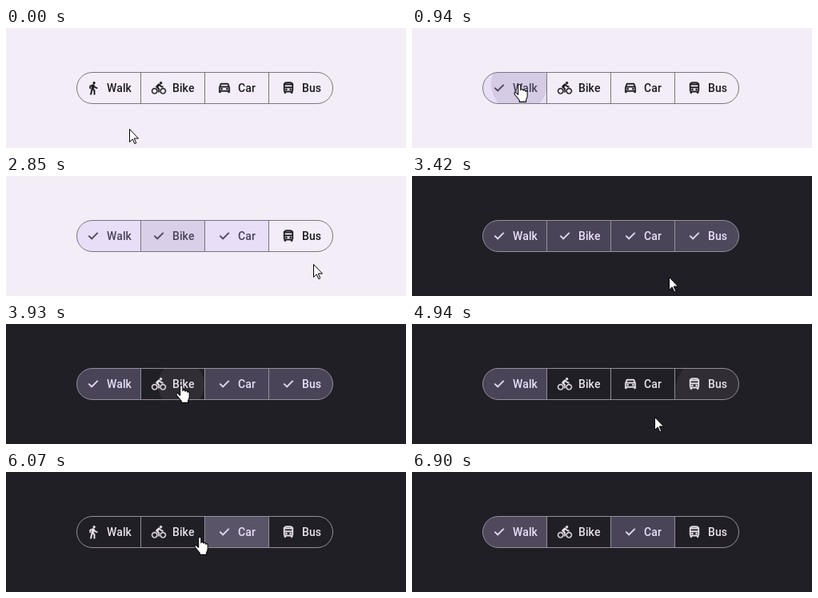
These frames come from a looping animation (500x150 px, 7230 ms). An HTML page:

```html
<!DOCTYPE html>
<html lang="en">
<head>
<meta charset="utf-8">
<title>Segmented buttons</title>
<style>
  html, body { margin: 0; width: 100%; height: 100%; overflow: hidden; }
  svg { display: block; width: 500px; height: 150px; }
  svg { --bg: #f3edf7; --ink: #1d1b20; --line: #79747e; --fill: #e8def8; --on: #4a4458; }
  svg.dark { --bg: #211f26; --ink: #e6e0e9; --line: #938f99; --fill: #4a4458; --on: #e8def8; }
  .bg { fill: var(--bg); }
  .outline { fill: none; stroke: var(--line); }
  .seg { color: var(--ink); fill: currentColor; }
  .seg.on { color: var(--on); }
  .box { fill: none; }
  .on .box { fill: var(--fill); }
  .ripple { fill: var(--on); fill-opacity: .07; }
  .on .ripple { fill-opacity: .12; }
  .icon, .check { stroke: currentColor; stroke-width: .5; }
  .check, .on .icon { visibility: hidden; }
  .on .check { visibility: visible; }
  text { font: 500 14px Roboto, sans-serif; letter-spacing: .1px; }
  .cursor { fill: #fff; stroke: #000; stroke-linejoin: round; }
</style>
</head>
<body>
<svg viewBox="0 0 500 150">
  <clipPath id="pill"><rect x="88.5" y="55.5" width="320" height="39" rx="19.5"/></clipPath>
  <rect class="bg" width="500" height="150"/>
  <g id="segs" clip-path="url(#pill)"></g>
  <rect class="outline" x="88.5" y="55.5" width="320" height="39" rx="19.5"/>
  <path class="outline" d="M168.5 56v38M248.5 56v38M328.5 56v38"/>
  <path id="arrow" class="cursor" d="M.5.5v16l3.7-3.6 2.6 5.8 2-.9-2.6-5.8h5.3z"/>
  <path id="hand" class="cursor" d="M5.5 12.5V2Q5.5.5 7 .5T8.5 2V7.5Q8.5 6 10 6.2T11.5 8Q11.7 6.7 13 7T14.3 9Q14.5 8 15.6 8.4T16.5 10V14.5Q16.5 16.5 15 19V21.5H7V19.5L2 13.5Q.2 11 1.2 10.3T3.5 11L5.5 13"/>
</svg>
<script>
const LOOP = 7230, DARK_AT = 3250;
const LEFT = 88.5, WIDTH = 80, TOP = 55, HEIGHT = 40;

const disc = (x, y) => `M${x - 1.5} ${y}a1.5 1.5 0 1 0 3 0 1.5 1.5 0 1 0-3 0z`;
const wheel = x => `M${x} 12c-2.8 0-5 2.2-5 5s2.2 5 5 5 5-2.2 5-5-2.2-5-5-5zm0 8.5c-1.9 0-3.5-1.6-3.5-3.5s1.6-3.5 3.5-3.5 3.5 1.6 3.5 3.5-1.6 3.5-3.5 3.5z`;
const CHECK = 'M9.55 18l-5.7-5.7 1.425-1.425L9.55 15.15l9.175-9.175L20.15 7.4z';

// label, label x, icon path
const items = [
  ['Walk', 126, 'M13.5 5.5c1.1 0 2-.9 2-2s-.9-2-2-2-2 .9-2 2 .9 2 2 2zM9.8 8.9L7 23h2.1l1.8-8 2.1 2v6h2v-7.5l-2.1-2 .6-3C14.8 12 16.8 13 19 13v-2c-1.9 0-3.5-1-4.3-2.4l-1-1.6c-.4-.6-1-1-1.7-1-.3 0-.5.1-.8.1L6 8.3V13h2V9.6z'],
  ['Bike', 208, 'M15.5 5.5c1.1 0 2-.9 2-2s-.9-2-2-2-2 .9-2 2 .9 2 2 2zM10.8 10.5l2.4-2.4.8.8c1.3 1.3 3 2.1 5.1 2.1V9c-1.5 0-2.7-.6-3.6-1.5l-1.9-1.9c-.5-.4-1-.6-1.6-.6s-1.1.2-1.4.6L7.8 8.4c-.4.4-.6.9-.6 1.4 0 .6.2 1.1.6 1.4L11 14v5h2v-6.2z' + wheel(5) + wheel(19)],
  ['Car', 290, 'M18.9 5C18.7 4.4 18.2 4 17.5 4h-11c-.7 0-1.2.4-1.4 1L3 11v8c0 .6.4 1 1 1h1c.6 0 1-.4 1-1v-1h12v1c0 .6.4 1 1 1h1c.6 0 1-.4 1-1v-8zM6.85 6h10.3l1.1 3.1H5.8zM19 16H5v-5h14z' + disc(7.5, 13.5) + disc(16.5, 13.5)],
  ['Bus', 370, 'M12 2c-4.4 0-8 .5-8 4v10c0 .9.4 1.7 1 2.2V20c0 .6.4 1 1 1h1c.6 0 1-.4 1-1v-1h8v1c0 .6.4 1 1 1h1c.6 0 1-.4 1-1v-1.8c.6-.5 1-1.3 1-2.2V6c0-3.5-3.6-4-8-4zm5.7 3H6.3C6.9 4.5 8.3 4 12 4s5.1.5 5.7 1zM18 7v3H6V7zm-.3 9.7l-.3.3H6.6l-.3-.3C6.2 16.6 6 16.4 6 16v-4h12v4c0 .4-.2.6-.3.7z' + disc(8.5, 14.5) + disc(15.5, 14.5)],
];

// Pointer legs: leaves at, arrives at, x, y, downward swing on the way
const legs = [
  [0, 0, 154, 126, 0],
  [240, 270, 152, 126, 0],
  [410, 800, 134, 70, 0],
  [1310, 2030, 287, 78, 41],
  [2150, 2545, 214, 78, 0],
  [2580, 2900, 388, 80, 57],
  [3020, 3200, 390, 160, 0],
  [3300, 3830, 219, 76, 0],
  [3950, 4180, 288, 78, 0],
  [4300, 4744, 372, 84, 30],
  [4790, 4950, 303, 116, 0],
  [5000, 5300, 136, 78, 0],
  [5400, 5790, 284, 80, 0],
  [6017, 6395, 124, 77, 4],
  [6470, 6740, 362, 156, 0],
];

const overPill = (x, y) => x > LEFT && x < LEFT + 4 * WIDTH && y > TOP && y < TOP + HEIGHT;

// Every stop on the pill is a click
const presses = legs.filter(([, , x, y]) => overPill(x, y))
  .map(([, time, x, y]) => ({ time, x, y, seg: Math.floor((x - LEFT) / WIDTH) }));

const $ = s => document.querySelector(s);
const stage = $('svg'), arrow = $('#arrow'), hand = $('#hand');

$('#segs').innerHTML = items.map(([label, x, icon], i) => {
  const box = `<rect class="box" x="${LEFT + WIDTH * i}" y="${TOP}" width="${WIDTH}" height="${HEIGHT}"/>`;
  const place = `transform="translate(${x - 26} 66) scale(.75)"`;
  return `<clipPath id="clip${i}">${box}</clipPath>
    <g class="seg" clip-path="url(#clip${i})">${box}
      <circle class="ripple"/>
      <path class="icon" ${place} d="${icon}"/><path class="check" ${place} d="${CHECK}"/>
      <text x="${x}" y="80">${label}</text>
    </g>`;
}).join('');
const segs = [...document.querySelectorAll('.seg')];

function pointer(t) {
  const i = legs.findLastIndex(leg => leg[0] <= t);
  const [from, to, x, y, swing] = legs[i], [, , px, py] = legs[Math.max(0, i - 1)];
  const u = to > from ? Math.min(1, (t - from) / (to - from)) : 1;
  const e = u * (2 - u);
  return [px + (x - px) * e, py + (y - py) * e + swing * 4 * u * (1 - u)].map(Math.round);
}

function drawRipple(circle, i, t) {
  const press = presses.find(p => p.seg === i && t >= p.time && t < p.time + 600);
  if (!press) return circle.setAttribute('r', 0);
  const { time, x, y } = press, dt = t - time, left = LEFT + WIDTH * i;
  const reach = Math.hypot(Math.max(x - left, left + WIDTH - x), Math.max(y - TOP, TOP + HEIGHT - y));
  circle.setAttribute('cx', x);
  circle.setAttribute('cy', y);
  circle.setAttribute('r', reach * (1 - (1 - Math.min(1, dt / 450)) ** 3));
  circle.setAttribute('opacity', Math.min(1, dt / 75, (600 - dt) / 375));
}

function draw(t) {
  stage.classList.toggle('dark', t >= DARK_AT);
  segs.forEach((seg, i) => {
    const clicks = presses.filter(p => p.seg === i && t >= p.time + 60).length;
    seg.classList.toggle('on', clicks % 2 === 1);
    drawRipple(seg.querySelector('circle'), i, t);
  });
  const [x, y] = pointer(t), over = overPill(x, y);
  arrow.setAttribute('transform', `translate(${x} ${y})`);
  hand.setAttribute('transform', `translate(${x - 7} ${y}) scale(1.04)`);
  arrow.style.display = over ? 'none' : '';
  hand.style.display = over ? '' : 'none';
}

const start = performance.now();
function tick() {
  draw((performance.now() - start) % LOOP);
  requestAnimationFrame(tick);
}
tick();
</script>
</body>
</html>
```
